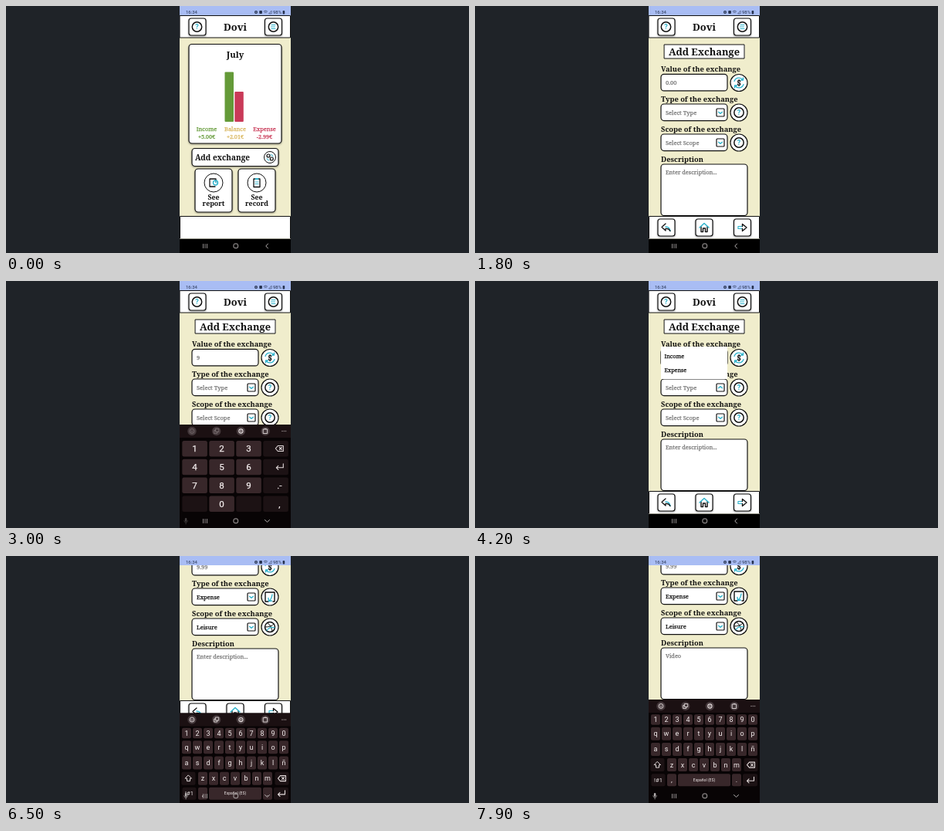
These frames come from a looping animation (600 px wide and 320 px high, 8 s). An HTML page:

```html
<!DOCTYPE html>
<html lang="en">
<head>
<meta charset="utf-8">
<title>Budget app</title>
<style>
html, body { margin: 0; width: 100%; height: 100%; overflow: hidden; background: #1f2328; }
svg { display: block; width: 600px; height: 320px; }
text { font-family: "Noto Serif", "Liberation Serif", serif; fill: currentColor; }
.ui { font-family: Roboto, "Liberation Sans", sans-serif; }
.strong { font-weight: 600; }
.medium { stroke: currentColor; stroke-width: .25px; }
.up { filter: drop-shadow(0 1px 1.2px #0006); }
</style>
</head>
<body>
<svg id="stage" viewBox="0 0 600 320"></svg>
<script>
const LOOP = 8000, INK = '#111', TEAL = '#2fb3cc', GREY = '#777', PALE = '#e4dcdc';
const GREEN = '#649a38', RED = '#c93a58', GOLD = '#d8b459', KEY = '#38272a', DARK_KEY = '#1c1214';

const rect = (x, y, w, h, fill, r = 0) =>
  `<rect x="${x}" y="${y}" width="${w}" height="${h}" rx="${r}" fill="${fill}"/>`;
const box = (x, y, w, h, r = 4, cls = '') =>
  `<rect x="${x}" y="${y}" width="${w}" height="${h}" rx="${r}" fill="#fff" stroke="${INK}" stroke-width="1.2" class="${cls}"/>`;
const ring = (x, y, r, color = INK, w = 1.2, fill = 'none') =>
  `<circle cx="${x}" cy="${y}" r="${r}" fill="${fill}" stroke="${color}" stroke-width="${w}"/>`;
const path = (d, color = INK, w = 1.2) =>
  `<path d="${d}" fill="none" stroke="${color}" stroke-width="${w}" stroke-linecap="round" stroke-linejoin="round"/>`;
const text = (s, x, y, size, { color = INK, mid, cls = '', id = '' } = {}) =>
  `<text id="${id}" x="${x}" y="${y}" font-size="${size}" class="${cls}" style="color:${color}"` +
  `${mid ? ' text-anchor="middle"' : ''}>${s}</text>`;
const group = (id, body, attrs = '') => `<g id="${id}" ${attrs}>${body}</g>`;
const at = (x, y, body) => `<g transform="translate(${x} ${y})">${body}</g>`;

const help = ring(0, 0, 6.2, INK, 1.5) + text('?', 0, 3.1, 9, { color: TEAL, mid: true, cls: 'ui strong' });
const badge = (y, body) => at(342, y, ring(0, 0, 11, INK, 1.2, '#fff') + body);

function header() {
  return rect(225, 12, 144, 29, '#fff') + path('M225.5 12.5H368.5V41H225.5Z', INK, 1) +
    box(237, 16, 22, 22, 3, 'up') + at(247.5, 27, help) +
    box(335.5, 16, 22, 22, 3, 'up') + ring(346.5, 27, 6.2, INK, 1.5) +
    path('M344 24.5h5M343.5 27h5M344 29.5h5', TEAL, 1) +
    text('Dovi', 297, 31.7, 12.8, { mid: true, cls: 'strong' });
}

function home() {
  const total = (name, sum, x, color) =>
    text(name, x, 162, 7.4, { color, mid: true, cls: 'medium' }) +
    text(sum, x, 171.8, 7.3, { color, mid: true, cls: 'medium' });
  const tile = (x, word, icon) => box(x, 211, 48, 56, 4, 'up') + ring(x + 24, 229, 12, INK, 1) +
    at(x + 24, 229, icon) + text('See', x + 24, 251, 8.8, { mid: true, cls: 'strong' }) +
    text(word, x + 24, 259, 8.8, { mid: true, cls: 'strong' });
  return box(237, 49.5, 120, 128.5, 4, 'up') +
    text('July', 297, 67, 11.3, { mid: true, cls: 'strong' }) +
    rect(283.5, 85.5, 11.5, 64.5, GREEN, 1) + rect(296.3, 111, 11.5, 39, RED, 1) +
    total('Income', '+5.00€', 260, GREEN) + total('Balance', '+2.01€', 297, GOLD) +
    total('Expense', '-2.99€', 335, RED) +
    box(241, 184.5, 112, 23, 4, 'up') + text('Add exchange', 245, 200, 10, { cls: 'strong' }) +
    ring(342, 196, 7.5, INK, 1) + ring(340, 194, 2) + ring(344.3, 198, 2) +
    path('M343 192.5q3 0 3 2.5M338 197.5q0 2.5 3 2.5', TEAL, .9) +
    tile(245, 'report', path('M3 -2V-5H-5V5H2', INK, 1.3) + ring(2.5, 0, 3, TEAL, 1.4) + path('M2.5 -2V0H4.5', TEAL, .9)) +
    tile(301, 'record', path('M-4 -5H4V5.5H-4Z', INK, 1.3) + path('M-1.5 -5H1.5', TEAL, 2) +
      path('M-2 -1H2M-2 1.5H2', TEAL, .9));
}

const footer = () => rect(225, 272.5, 144, 29, '#fff') + path('M225.5 301V272.5H368.5V301', INK, 1);

function form() {
  const label = (s, y) => text(s, 241, y, 9.3, { cls: 'strong' });
  const field = (id, s, y) => box(241, y, 86, 21.6) +
    text(s, 247, y + 13.6, 7.5, { id, color: GREY, cls: 'medium' });
  const select = (id, s, y) => field(id, s, y) + box(313, y + 6, 10, 10, 1) +
    `<path id="${id}Arrow" fill="none" stroke="${TEAL}" stroke-width="1.4"/>`;
  const menu = (id, y, bottom, items) => group(id, rect(241, y, 86, bottom - y, '#fff') +
    items.map((s, i) => text(s, 245.5, y + 15 + i * 18, 7.2, { cls: 'medium' })).join(''));
  const money = path('M-6 -2A6.3 6.3 0 0 1 5 -4M6 2A6.3 6.3 0 0 1 -5 4M5.5 -6.5V-3.5H2.5M-5.5 6.5V3.5H-2.5', TEAL, 1.3) +
    text('$', 0, 3.1, 8.8, { mid: true, cls: 'ui strong medium' });
  const spend = path('M-2 6H-6V-6H6V6H4', INK, 1.4) + path('M3 -3Q2 3 -1 5M-2 1.5L-1.5 5.5L2.5 5', TEAL, 1.4);
  const ball = ring(0, 0, 6.5, INK, 1.5) + path('M-3 -5.5Q3 0 3 6M-6 0Q2 0 5 -4', INK, 1) +
    path('M-4 4.5Q0 -1 6 1', TEAL, 1.2);
  const button = (x, icon) => box(x - 11, 276, 22, 22, 3, 'up') + at(x, 287, icon);
  return rect(245, 50, 104.5, 18, '#fff') + path('M245.5 50H349V68H245.5Z', INK, 1) +
    text('Add Exchange', 297, 64, 12.8, { mid: true, cls: 'strong' }) +
    label('Value of the exchange', 85.2) + field('value', '0.00', 88.3) + badge(99.5, money) +
    label('Type of the exchange', 124) + select('type', 'Select Type', 127) +
    badge(138, group('typeHelp', help) + group('typeIcon', spend)) +
    label('Scope of the exchange', 163) + select('scope', 'Select Scope', 166) +
    badge(177, group('scopeHelp', help) + group('scopeIcon', ball)) +
    label('Description', 201.8) + box(241, 205, 112, 66.5) +
    text('Enter description...', 247, 218, 7.4, { id: 'note', color: GREY, cls: 'medium' }) +
    menu('typeMenu', 85, 127, ['Income', 'Expense']) +
    menu('scopeMenu', 69.5, 166, ['Food', 'Leisure', 'Medicine', 'Useful', 'Other']) +
    footer() +
    button(248, path('M5 4.5Q4 -1 -1 -1', TEAL, 1.5) + path('M-1 -5L-6 -.5L-1 4V1.5Q3 1 5 4.5', INK, 1.3)) +
    button(297, path('M-4 -1V5.5H-1.5V1H1.5V5.5H4V-1', INK, 1.4) + path('M-6 0L0 -5.5L6 0', TEAL, 1.5)) +
    button(346.5, path('M0 -1.5H-5.5V1.5H0', TEAL, 1.2) + path('M0 -1.5V-4.5L5.5 0L0 4.5V1.5', INK, 1.4));
}

const backspace = path('M-5 0L-2 -3.5H5V3.5H-2ZM0 -1.5L3 1.5M3 -1.5L0 1.5', PALE, 1.1);
const enter = path('M5 -4V1H-4M-1.5 -1.5L-4 1L-1.5 3.5', PALE, 1.1);

function keyboard(id, keys) {
  const icons = [
    ring(0, 0, 3, PALE, .9) + path('M-1.3 .8Q0 2 1.3 .8M-1 -.8v.1M1 -.8v.1', PALE, .7),
    path('M-1 -3H3V1H-1ZM-1 -1H-3V3H1V1', PALE, .9),
    ring(0, 0, 2.6, PALE, 1.1) + ring(0, 0, .8, PALE, .7),
    path('M-2.5 -2.5H2.5V3H-2.5ZM-1 -3H1', PALE, .9)
  ];
  const bar = icons.map((icon, i) => {
    const faded = id === 'numpad' && i < 2 ? .3 : 1;
    return at(241 + i * 31.7, 194.5, ring(0, 0, 5.7, 'none', 0, '#43373a') + `<g opacity="${faded}">${icon}</g>`);
  }).join('');
  return group(id, rect(225, 186, 144, 136, '#080405') + rect(225, 186, 144, 17, '#1b1012') + bar +
    [358, 360.3, 362.6].map(x => ring(x, 194.5, .35, PALE, .6)).join('') + keys);
}

function numpad() {
  const rows = [['1', '2', '3', backspace], ['4', '5', '6', enter], ['7', '8', '9', '.-'], ['', '0', '', ',']];
  return keyboard('numpad', rows.map((row, j) => row.map((s, i) => {
    const x = 228.3 + i * 35, y = 207 + j * 23.8;
    const face = s[0] === '<' ? at(x + 21, y + 10, s)
      : text(s, x + (i < 3 ? 16.3 : 21), y + 14.2, 11.6, { color: '#f4eeee', mid: true, cls: 'ui medium' });
    return rect(x, y, 32.6, 20.5, i < 3 && s ? KEY : DARK_KEY, 2.5) + face;
  }).join('')).join(''));
}

function letters() {
  const key = (s, x, y, w, h, fill = KEY, size = 9) => rect(x - w / 2, y - h / 2, w, h, fill, 2) +
    (s[0] === '<' ? at(x, y, s) : text(s, x, y + size * .33, size, { color: '#f4eeee', mid: true, cls: 'ui' }));
  const row = (s, x, y, h) => [...s].map((c, i) => key(c, x + i * 14, y, 12, h)).join('');
  const shiftKey = path('M0 -4L4 0H2V3.5H-2V0H-4Z', PALE, 1);
  return keyboard('letters', row('1234567890', 234, 212, 13.5) + row('qwertyuiop', 234, 230.3, 17) +
    row('asdfghjklñ', 234, 250.5, 17) + row('zxcvbnm', 255, 270.6, 17) +
    key(shiftKey, 236.5, 270.6, 18, 17, DARK_KEY) + key(backspace, 357.5, 270.6, 18, 17, DARK_KEY) +
    key('!#1', 237.5, 290.3, 18, 16, DARK_KEY, 7.5) + key(',', 255, 290.3, 12, 16) +
    key('Español (ES)', 297, 290.3, 68, 16, KEY, 5) + key('.', 339, 290.3, 12, 16) +
    key(enter, 356.5, 290.3, 19, 16, DARK_KEY));
}

function statusBar() {
  const c = '#26324f';
  return rect(225, 0, 144, 12, '#a9bdf4') + text('16:34', 233, 10, 6, { color: c, cls: 'ui' }) +
    ring(324, 8, 1.4, c, 1.2) + rect(328.3, 6, 3.6, 4, c, .8) +
    path('M334 7Q336.3 5 338.6 7M335.2 8.4Q336.3 7.5 337.4 8.4', c, .7) +
    path('M341 10H344V6.5Z', c, .5) + text('98%', 346, 10.2, 6, { color: c, cls: 'ui' }) +
    rect(358.6, 6, 2.6, 4.4, c, .7);
}

const navIcons = () => path('M255.5 308.5V313.5M258 308.5V313.5M260.5 308.5V313.5', '#b5b0b0', .8) +
  `<rect x="295" y="308" width="5.6" height="5.6" rx="1.8" fill="none" stroke="#b5b0b0"/>` +
  group('backIcon', path('M339.5 308L336.8 311L339.5 314', '#b5b0b0', 1)) +
  group('hideIcon', path('M335.5 309.5L338.5 312.3L341.5 309.5', '#b5b0b0', 1)) +
  group('mic', rect(231.9, 307, 2.4, 4.8, '#b5b0b0', 1.2) +
    path('M230.8 310.5Q231 313 233.1 313Q235.2 313 235.4 310.5M233.1 313V315', '#b5b0b0', .7));

const stage = document.getElementById('stage');
stage.innerHTML = '<clipPath id="screen"><rect x="225" y="12" width="144" height="289.5"/></clipPath>' +
  rect(225, 0, 144, 320, '#000') +
  group('view', group('page', rect(225, 12, 144, 290, '#f0edcc') + header() +
    group('home', home() + footer()) + group('form', form())), 'clip-path="url(#screen)"') +
  numpad() + letters() + statusBar() + navIcons();

const el = id => document.getElementById(id);
const show = (id, on) => { el(id).style.display = on ? '' : 'none'; };
const shift = (id, y) => el(id).setAttribute('transform', `translate(0 ${y})`);
const easeOut = (t, start, length, power) =>
  1 - (1 - Math.min(1, Math.max(0, (t - start) / length))) ** power;
const typed = (s, t, times) => s.slice(0, times.filter(k => t >= k).length);

function setText(id, s, color = GREY) {
  el(id).textContent = s;
  el(id).style.color = color;
}

function setSelect(id, y, open, chosen, hint, choice) {
  show(id + 'Menu', open);
  show(id + 'Help', !chosen);
  show(id + 'Icon', chosen);
  setText(id, chosen ? choice : hint, chosen ? INK : GREY);
  const tip = open ? -2 : 2;
  el(id + 'Arrow').setAttribute('d', `M315.2 ${y - tip / 2}L318 ${y + tip * .7}L320.8 ${y - tip / 2}`);
}

function draw(t) {
  show('home', t < 1100);
  show('form', t >= 1100);
  setText('value', typed('9.99', t, [2900, 3100, 3300, 3500]) || '0.00');
  setSelect('type', 138, t >= 4100 && t < 4800, t >= 4800, 'Select Type', 'Expense');
  setSelect('scope', 177, t >= 5300 && t < 5900, t >= 5900, 'Select Scope', 'Leisure');
  setText('note', typed('Video', t, [7100, 7300, 7500, 7700, 7850]) || 'Enter description...');

  const numbers = easeOut(t, 2200, 315, 2) - easeOut(t, 3700, 250, 2);
  const alphabet = easeOut(t, 6300, 315, 2);
  show('numpad', numbers > 0);
  show('letters', alphabet > 0);
  shift('numpad', 134 * (1 - numbers));
  shift('letters', 134 * (1 - alphabet));
  shift('page', -86 * easeOut(t, 6300, 260, 3));
  const typing = numbers > 0 || alphabet > 0;
  show('hideIcon', typing);
  show('mic', typing);
  el('mic').style.opacity = numbers > 0 ? .35 : 1;
  show('backIcon', !typing);
}

const start = performance.now();
function frame() {
  draw((performance.now() - start) % LOOP);
  requestAnimationFrame(frame);
}
frame();
</script>
</body>
</html>
```
